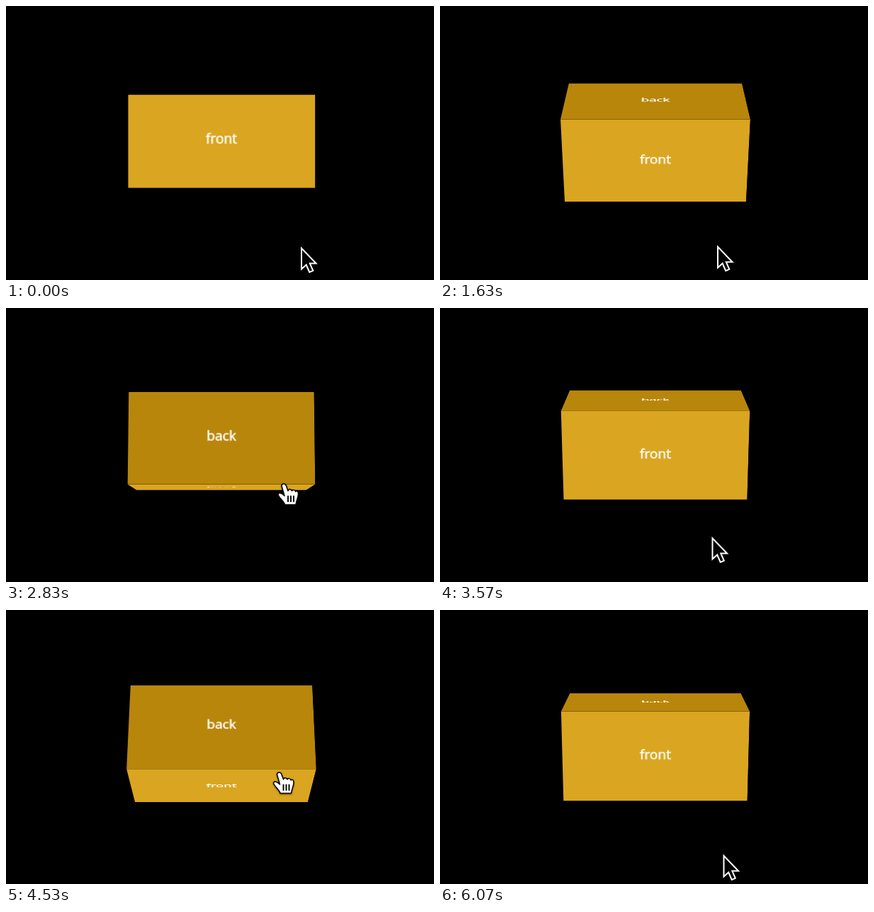
These frames come from a looping animation (604 px wide and 388 px high, 6.1 s). An HTML page:

```html
<!DOCTYPE html>
<html lang="en">
<head>
<meta charset="utf-8">
<title>Flip button</title>
<style>
  html, body { margin: 0; width: 100%; height: 100%; overflow: hidden; background: #000; }
  #scene {
    position: absolute; left: 179px; top: 129px; width: 250px; height: 125px;
    perspective: 1250px;
  }
  #box { width: 100%; height: 100%; transform-style: preserve-3d; }
  .face {
    position: absolute; inset: 0; backface-visibility: hidden;
    font: 18.2px/119px "Open Sans", sans-serif; color: #fff; text-align: center;
    -webkit-text-stroke: 0.5px #fff;
  }
  .front { background: #daa520; transform: translateZ(62.5px); }
  .back { background: #b8860b; transform: rotateX(90deg) translateZ(62.5px); }
  svg { position: absolute; left: 0; top: 0; overflow: visible; }
  #hand { filter: drop-shadow(0 1.5px 1px rgba(0, 0, 0, 0.5)); }
</style>
</head>
<body>
<div id="scene">
  <div id="box">
    <div class="face front">front</div>
    <div class="face back">back</div>
  </div>
</div>
<svg width="604" height="388">
  <g id="cursor">
    <path id="arrow" fill="#000" stroke="#fff" stroke-width="2"
      d="M0 0V29.5L6.7 23.5L11.2 34L16.3 31.8L11.8 21.6H20.6Z"/>
    <g id="hand" stroke="#000" stroke-width="1.5" stroke-linejoin="round" stroke-linecap="round">
      <path fill="#fff" d="M-2.500 3C-2.500-1 3-1 4 3L6.500 10C7 7 11 7 12 10C12.500 8 16.500 8 17 11
        C18 9.500 21 10 21 14C21 20 18.500 22 17.500 29.500H2C1 25-7 19-7.500 15C-7 11.500-2 13 1.500 17Z"/>
      <path fill="none" stroke-width="1.9" d="M6.500 17.500V25M10.500 17.500V25M14.500 17.500V25"/>
    </g>
  </g>
</svg>
<script>
const LOOP = 6100, FLIP = 600;
const $ = id => document.getElementById(id);

// The pointer sets off, enters the button, rests inside, then leaves for a spot below.
const home = [417, 343];
const visits = [
  { approach: 290, enter: 584, leave: 1378, inside: [404, 242], outside: [392, 341] },
  { approach: 2210, enter: 2428, leave: 3258, inside: [391.5, 249], outside: [384.5, 326] },
  { approach: 4110, enter: 4269, leave: 5746, inside: [385, 230], outside: [400.5, 348] }
];

const clamp = v => Math.min(1, Math.max(0, v));
const progress = (t, start, end) => clamp((t - start) / (end - start));
const smooth = u => u * u * (3 - 2 * u);
const mix = (a, b, p) => a.map((v, i) => v + (b[i] - v) * p);
const bezier = (a, b, s) => 3 * a * s * (1 - s) ** 2 + 3 * b * s * s * (1 - s) + s ** 3;

// CSS "ease"
function ease(x) {
  let lo = 0, hi = 1;
  for (let i = 0; i < 24; i++) {
    const mid = (lo + hi) / 2;
    if (bezier(0.25, 0.25, mid) < x) lo = mid; else hi = mid;
  }
  return bezier(0.1, 1, lo);
}

function draw(now) {
  const t = now % LOOP;
  const index = Math.max(0, visits.findLastIndex(v => v.approach <= t));
  const { approach, enter, leave, inside, outside } = visits[index];

  const flip = start => ease(progress(t, start, start + FLIP));
  $("box").style.transform = `rotateX(${-90 * (flip(enter) - flip(leave))}deg)`;

  const from = index ? visits[index - 1].outside : home;
  const arriving = mix(from, inside, smooth(progress(t, approach, enter + 90)));
  const pointer = mix(arriving, outside, smooth(progress(t, leave - 50, leave + 220)));
  $("cursor").setAttribute("transform", `translate(${pointer})`);

  const hovering = t >= enter && t < leave;
  $("hand").style.display = hovering ? "" : "none";
  $("arrow").style.display = hovering ? "none" : "";
}

const origin = performance.now();
function tick() {
  draw(performance.now() - origin);
  requestAnimationFrame(tick);
}
tick();
</script>
</body>
</html>
```
